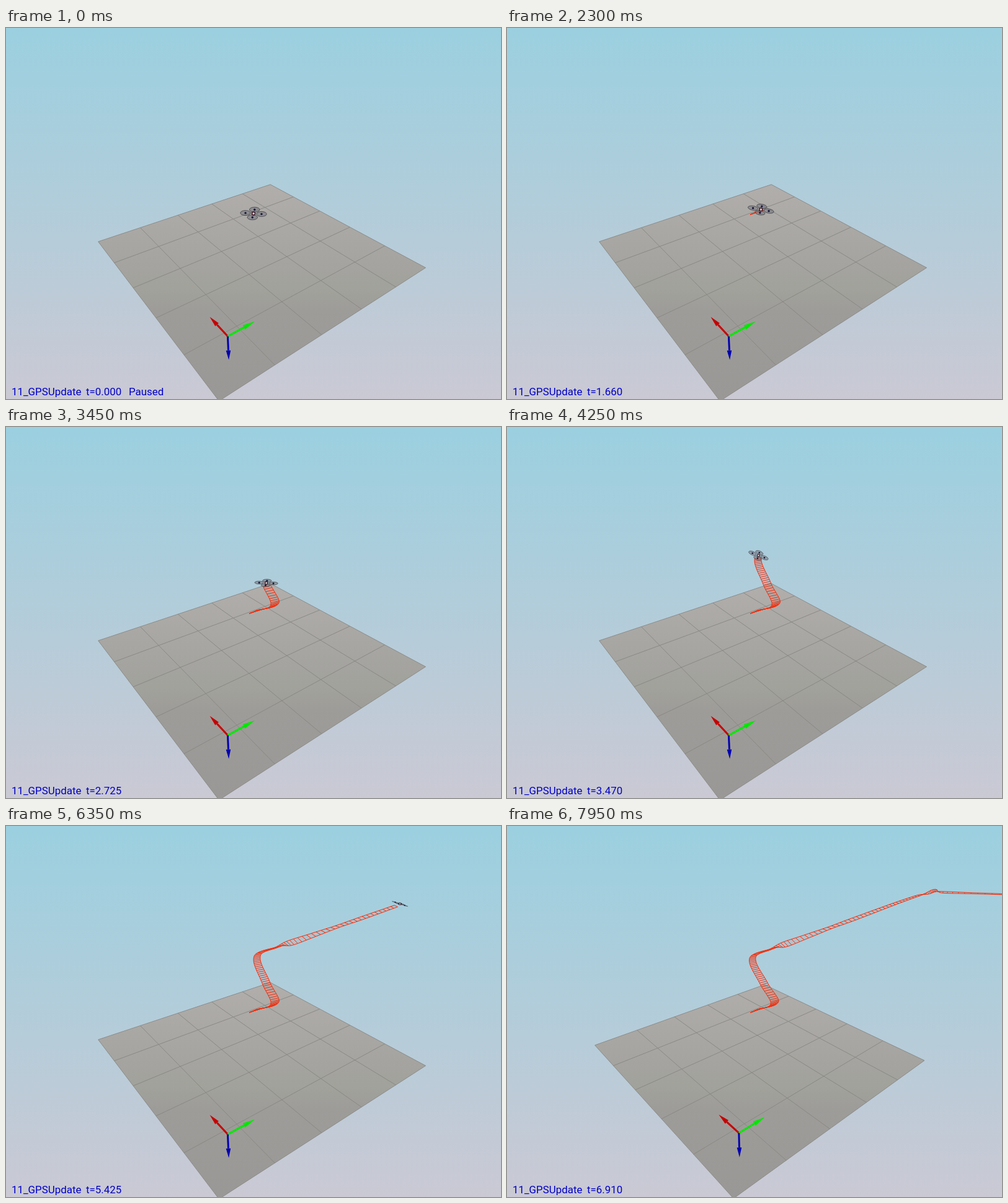
These frames come from a looping animation (798x599 px, 8 s). An HTML page with a canvas:

```html
<!DOCTYPE html>
<html>
<head>
<meta charset="utf-8">
<style>
  html, body { margin: 0; width: 100%; height: 100%; overflow: hidden; }
  canvas { display: block; }
</style>
</head>
<body>
<canvas id="stage" width="798" height="599"></canvas>
<script>
// World axes: north, east, up. Times in ms.
const W = 798, H = 599, FOCAL = 641.5;
const LOOP = 8000, STEP = 50, TAKEOFF = 550;
const TRAIL_START = 1250, TRAIL_LAG = 60, TRAIL_DROP = .03;
const HOME = [1.96, 1.96, .53], ORBIT = 7.98;
const ARM = .163, WING = .11, AXIS = .5;
const GRAVITY = 9.8, DRAG = 1.1;
const NORTH = [1, 0, 0], EAST = [0, 1, 0];

const WAYPOINTS = [
  { t: TAKEOFF, p: HOME },
  { t: 1350, p: [1.96, 1.97, .57] },
  { t: 2300, p: [1.97, 2.13, .56] },
  { t: 3000, p: [2.05, 2.6, .53] },
  { t: 3450, p: [2.81, 2.97, .58] },
  { t: 4250, p: [4.01, 3.64, .72] },
  { t: 4800, p: [3.98, 4.3, .82] },
  { t: 5150, p: [3.88, 4.83, .89] },
  { t: 5700, p: [3.88, 6.84, 1.01] },
  { t: 7050, p: [3.85, 12, 1.29] },
  { t: 7450, p: [3.4, 12.45, 1.29] },
  { t: 8150, p: [.9, 14.5, 1.3] }
];

const ctx = document.getElementById('stage').getContext('2d');
const clamp = v => Math.max(0, Math.min(1, v));
const mix = (a, b, k) => a + (b - a) * k;
const add = (a, b, k = 1) => a.map((v, i) => v + b[i] * k);
const dot = (a, b) => a.reduce((sum, v, i) => sum + v * b[i], 0);
const unit = a => a.map(v => v / Math.hypot(...a));

// Orbits the home point; returns a function from world to [x, y, pixels per unit]
function camera(t) {
  const turn = clamp((t - 7500) / 450);
  const yaw = mix(37.15, 40.3, turn) * Math.PI / 180;
  const pitch = mix(29.34, 28.2, turn) * Math.PI / 180;
  const [cy, sy, cp, sp] = [Math.cos(yaw), Math.sin(yaw), Math.cos(pitch), Math.sin(pitch)];
  const right = [-sy, cy, 0], down = [-sp * cy, -sp * sy, -cp], ahead = [cp * cy, cp * sy, -sp];
  return point => {
    const offset = add(point, HOME, -1);
    const scale = FOCAL / (ORBIT + dot(offset, ahead));
    return [W / 2 + dot(offset, right) * scale, H / 2 + dot(offset, down) * scale, scale];
  };
}

// Smooth curve through the waypoints
function position(t) {
  const next = WAYPOINTS.findIndex((w, n) => n && t <= w.t);
  const a = WAYPOINTS[next - 1], b = WAYPOINTS[next];
  const before = WAYPOINTS[next - 2] || a, after = WAYPOINTS[next + 1] || b;
  const span = b.t - a.t, k = clamp((t - a.t) / span), k2 = k * k, k3 = k2 * k;
  return a.p.map((start, i) => {
    const slopeIn = (b.p[i] - before.p[i]) / (b.t - before.t) * span;
    const slopeOut = (after.p[i] - start) / (after.t - a.t) * span;
    return mix(start, b.p[i], 3 * k2 - 2 * k3) + (k3 - 2 * k2 + k) * slopeIn + (k3 - k2) * slopeOut;
  });
}

// The drone leans into its acceleration and against drag
function attitude(t) {
  const h = .2, p = position(t);
  const past = position(t - h * 1000), future = position(Math.min(t + h * 1000, 8150));
  const thrust = p.map((v, i) =>
    (future[i] - 2 * v + past[i]) / (h * h) + DRAG * (future[i] - past[i]) / (2 * h));
  thrust[2] += GRAVITY;
  const up = unit(thrust);
  const [front, side] = [NORTH, EAST].map(axis => unit(add(axis, up, -dot(axis, up))));
  return { p, front, side };
}

function gradient(from, to, stops) {
  const fill = ctx.createLinearGradient(0, from, 0, to);
  stops.forEach(([at, color]) => fill.addColorStop(at, color));
  return fill;
}

const SKY = gradient(0, H, [[0, '#9bd0e0'], [1, '#cac9d4']]);
const FLOOR = gradient(250, 600, [[0, '#b1aeac'], [.4, '#a4a39f'], [.49, '#a1a29b'],
  [.59, '#9e9c99'], [1, '#9a9896']]);

function path(points) {
  ctx.beginPath();
  points.forEach(([x, y]) => ctx.lineTo(x, y));
}

function shape(points, color) {
  path(points);
  ctx.fillStyle = color;
  ctx.fill();
}

function line(points, color, width = 1) {
  path(points);
  ctx.strokeStyle = color;
  ctx.lineWidth = width;
  ctx.stroke();
}

function disc(x, y, r, color) {
  ctx.beginPath();
  ctx.arc(x, y, r, 0, 2 * Math.PI);
  ctx.fillStyle = color;
  ctx.fill();
}

function drawGround(project) {
  const low = -.5, high = 4.5, at = (n, e) => project([n, e, low]);
  shape([at(low, low), at(high, low), at(high, high), at(low, high)], FLOOR);
  for (let i = low; i <= high; i++) {
    line([at(i, low), at(i, high)], '#868682', .9);
    line([at(low, i), at(high, i)], '#868682', .9);
  }
}

function drawAxes(project) {
  const [ox, oy] = project([0, 0, 0]);
  for (const [axis, color] of [[NORTH, '#c60000'], [EAST, '#00e800'], [[0, 0, -1], '#0000b0']]) {
    const [tx, ty] = project(axis.map(v => v * AXIS));
    const [nx, ny] = unit([oy - ty, tx - ox]).map(v => v * 3.8);
    const bx = mix(ox, tx, .6), by = mix(oy, ty, .6);
    line([[ox, oy], [bx, by]], color, 3);
    shape([[tx, ty], [bx + nx, by + ny], [bx - nx, by - ny]], color);
  }
}

function drawTrail(t, project) {
  const left = [], right = [];
  for (let s = TRAIL_START; s <= t - TRAIL_LAG + 10; s += STEP) {
    const { p, side } = attitude(s);
    const center = add(p, [0, 0, -TRAIL_DROP]);
    left.push(project(add(center, side, -WING)));
    right.push(project(add(center, side, WING)));
  }
  shape([...left, ...right.slice().reverse()], 'rgba(255,90,60,.1)');
  left.forEach((p, i) => line([p, right[i]], '#f03010'));
  line(left, '#f62c08');
  line(right, '#f62c08');
}

function drawDrone(t, project) {
  const { p, front, side } = attitude(t);
  const [x, y, scale] = project(p), size = scale / 80;
  const arms = [add(front, side), add(front, side, -1)].map(arm => {
    const [ax, ay] = project(add(p, unit(arm), ARM));
    return [ax - x, ay - y];
  });
  const [[ax, ay], [bx, by]] = arms;
  const rotors = [[ax, ay], [bx, by], [-ax, -ay], [-bx, -by]];
  ctx.lineWidth = .9 * size;
  for (const [rx, ry] of rotors) {
    ctx.save();
    ctx.transform(ax * .63, ay * .63, bx * .63, by * .63, x + rx, y + ry);
    ctx.beginPath();
    ctx.arc(0, 0, 1, 0, 2 * Math.PI);
    ctx.restore();
    ctx.fillStyle = 'rgba(122,122,130,.6)';
    ctx.fill();
    ctx.strokeStyle = 'rgba(50,50,55,.8)';
    ctx.stroke();
  }
  rotors.forEach(([rx, ry]) => disc(x + rx, y + ry, 1.7 * size, '#16163a'));
  disc(x, y, 3.4 * size, '#3a2530');
  disc(x, y, 1.8 * size, '#d8c8cc');
  disc(x - 2 * size, y, size, '#c02020');
}

function drawLabel(t) {
  const flying = t >= TAKEOFF;
  const seconds = flying ? Math.round((.03 + .00093 * (t - TAKEOFF)) * 200) / 200 : 0;
  ctx.font = '16.9px Roboto, sans-serif';
  ctx.fillStyle = '#0000c8';
  ctx.fillText('11_GPSUpdate', 9, 593);
  ctx.fillText('t=' + seconds.toFixed(3), 129, 593);
  if (!flying) ctx.fillText('Paused', 198, 593);
}

function draw(now) {
  const t = Math.floor(now % LOOP / STEP) * STEP;
  const project = camera(t);
  ctx.fillStyle = SKY;
  ctx.fillRect(0, 0, W, H);
  drawGround(project);
  drawAxes(project);
  drawTrail(t, project);
  drawDrone(t, project);
  drawLabel(t);
}

const start = performance.now();
function tick() {
  draw(performance.now() - start);
  requestAnimationFrame(tick);
}
tick();
</script>
</body>
</html>
```
